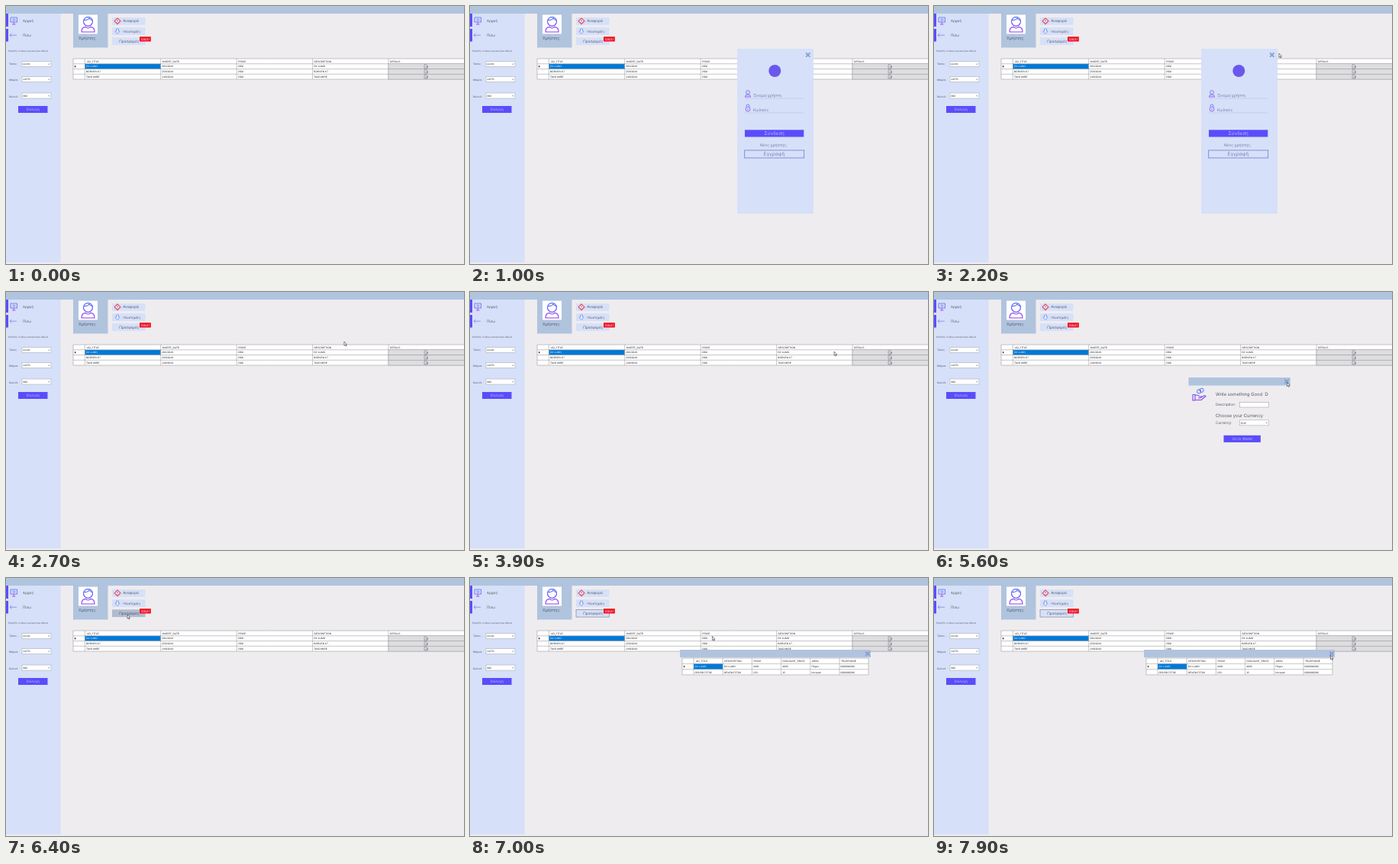
Write an HTML page with a canvas that moves like this. It is 600 px wide and 338 px high and loops after 8000 ms.

```html
<!DOCTYPE html>
<html lang="el">
<head>
<meta charset="utf-8">
<title>Car listings</title>
<style>
html, body { margin: 0; width: 100%; height: 100%; overflow: hidden; background: #eeecef; }
canvas { display: block; width: 600px; height: 338px; }
</style>
</head>
<body>
<canvas id="stage" width="600" height="338"></canvas>
<script>
const ctx = document.getElementById('stage').getContext('2d');
const LOOP = 8000, STEP = 100;
const PAGE = '#eeecef', STEEL = '#b0c4de', PALE = '#d6e0f8', VIOLET = '#5b4cfb';
const INK = '#30303c', SOFT = '#5f6296', BLUE = '#5a7ff0', GRID = '#a0a0a0';
const UI = 'Inter, "Noto Sans", sans-serif';
const CELL = '"Liberation Sans", Arial, sans-serif';

// Pointer tip: time, x, y
const PATH = [
  [1600, 541, 84], [1900, 500, 46], [2300, 443, 65], [2900, 443, 65],
  [3250, 477, 78], [3900, 477, 78], [4200, 548.5, 89], [4400, 548.5, 89],
  [4700, 466, 117], [5500, 462.5, 118.5], [5700, 462.5, 118.5],
  [6300, 159, 48], [6700, 159, 48], [7350, 517, 112], [7800, 519.5, 101.5]
];

function rect(x, y, w, h, fill, line, width = 0.6) {
  if (fill) { ctx.fillStyle = fill; ctx.fillRect(x, y, w, h); }
  if (line) { ctx.strokeStyle = line; ctx.lineWidth = width; ctx.strokeRect(x, y, w, h); }
}

function text(s, x, y, size, color = INK, font = UI, align = 'left', weight = 300) {
  ctx.font = `${weight} ${size}px ${font}`;
  ctx.fillStyle = color;
  ctx.textAlign = align;
  ctx.fillText(s, x, y);
}

function cell(s, x, y, color = '#222') {
  text(s, x, y, 3.3, color, CELL, 'left', 400);
}

function stroke(d, color, width = 0.8, x = 0, y = 0, fill) {
  ctx.save();
  ctx.translate(x, y);
  const p = new Path2D(d);
  if (fill) { ctx.fillStyle = fill; ctx.fill(p); }
  ctx.strokeStyle = color;
  ctx.lineWidth = width;
  ctx.stroke(p);
  ctx.restore();
}

function ring(x, y, r, color, width = 0.8, fill) {
  ctx.beginPath();
  ctx.arc(x, y, r, 0, Math.PI * 2);
  if (fill) { ctx.fillStyle = fill; ctx.fill(); }
  ctx.strokeStyle = color;
  ctx.lineWidth = width;
  ctx.stroke();
}

function fade(y0, y1) {
  const g = ctx.createLinearGradient(0, y0, 0, y1);
  g.addColorStop(0, '#4f78f2');
  g.addColorStop(1, '#9a35ee');
  return g;
}

function closeMark(x, y) {
  stroke('M-2.6-2.6L2.6 2.6M2.6-2.6L-2.6 2.6', '#6f8cc8', 1.5, x, y);
  stroke('M-2.6-2.6L2.6 2.6M2.6-2.6L-2.6 2.6', '#c3d2ee', 0.4, x, y);
}

function select(s, x, y) {
  rect(x, y, 38, 7, '#fff', '#a9adb8');
  cell(s, x + 1.5, y + 4.7);
  stroke('M-1.2-.6L0 .6L1.2-.6', '#555', 0.6, x + 35.3, y + 3.6);
}

function button(s, x, y, w, h, size) {
  rect(x, y, w, h, VIOLET);
  text(s, x + w / 2, y + h / 2 + size * 0.33, size, '#d3dcff', UI, 'center');
}

function grid(cols, top, header, rows, rowH) {
  const left = cols[0], right = cols[cols.length - 1];
  const bottom = top + rowH * (rows.length + 1);
  rect(left, top, right - left, bottom - top, '#fff');
  rect(cols[1], top + rowH, cols[2] - cols[1], rowH, '#0078d7');
  header.forEach((s, i) => cell(s, cols[i + 1] + 2 + (i ? 0 : 1), top + rowH * 0.68));
  rows.forEach((row, r) => row.forEach((s, i) =>
    cell(s, cols[i + 1] + 1.6, top + rowH * (r + 1.68), r || i ? '#222' : '#fff')));
  const lines = () => {
    ctx.beginPath();
    for (let y = top; y < bottom + 1; y += rowH) { ctx.moveTo(left, y); ctx.lineTo(right, y); }
    for (const x of cols) { ctx.moveTo(x, top); ctx.lineTo(x, bottom); }
    ctx.strokeStyle = GRID;
    ctx.lineWidth = 0.6;
    ctx.stroke();
  };
  lines();
  stroke('M0-1.3L1.6 0L0 1.3Z', '#222', 0.2, left + 2, top + rowH * 1.5, '#222');
}

function sidebar() {
  rect(0, 10, 71.5, 326, PALE);
  rect(0, 10, 3, 17, VIOLET);
  rect(0, 30, 3, 16.5, VIOLET);
  stroke('M6 15H14.5V21H6ZM10.2 21V24M8 24H12.5', fade(14, 24), 0.8);
  stroke('M9 17H12V19H9Z', BLUE, 0.6);
  stroke('M14 38.2H5M7.4 36L5 38.2L7.4 40.4', '#7b70ec', 0.7);
  text('Αρχική', 22, 20.6, 4.4);
  text('Πίσω', 22, 39.8, 4.5);
  text('Επιλέξτε τι είδους αυτοκινήτου θέλετε', 3, 59.7, 2.9);
  text('Τύπος:', 4, 77.4, 3.4);
  text('Μάρκα:', 4, 98, 3.4);
  text('Κυλινδ:', 4, 119.5, 3.4);
  select('κουπέ', 21, 72.5);
  select('AUTO', 21, 92.5);
  select('800', 21, 114);
  button('Επιλογή', 16, 131, 38.5, 9, 4.5);
}

function userPanel() {
  rect(88, 0, 45.5, 54.5, STEEL);
  rect(95, 11.5, 25, 25, '#fff');
  const g = fade(13, 35);
  ring(107.5, 20.3, 6, g, 1.2);
  stroke('M101.6 19Q106 19 108-2.5', 'transparent');
  stroke('M102 18.5Q107 19 109 16Q111 18.5 113.4 19M99 34Q99 28 104 27.4Q107.5 30.5 111 27.4Q116 28 116 34Z', g, 1.1);
  text('Χρήστης', 95, 44, 5.5, '#37415c');
}

function menu(t) {
  const hover = t >= 6200 && t < 6800;
  rect(139, 15, 43.5, 9.8, PALE);
  rect(139, 28.2, 43.5, 9.8, PALE);
  rect(139, 41.3, 43.5, 9.8, hover ? '#b1bbcf' : PALE, t >= 6600 ? '#6d7894' : null);
  stroke('M146 15.8L149.9 19.7L146 23.6L142.1 19.7Z', '#e64455', 1.1, 0, 0, '#f7e6f0');
  stroke('M146 18V20M146 20.8V21.5', '#4a63d8', 0.9);
  stroke('M144.6 30H147.4V33H149.2L146 36.6L142.8 33H144.6Z', '#6c92ee', 0.8, 0, 0, '#e6eefc');
  text('Αναφορά', 153.2, 21.4, 4.7);
  text('Υποστήριξη', 153.2, 34.6, 4.1);
  text('Προσφορές', 148.3, 47.8, 4.7);
  rect(175, 40.2, 14.8, 6.3, '#f01020');
  text('SALE!', 182.4, 44.8, 3.9, '#fff', UI, 'center', 400);
}

function listing() {
  const cols = [88, 103.3, 202.7, 302.2, 401.6, 501, 601];
  const cars = [['DX LUMO', '20/1/2019', '4500'], ['BORVEN K7', '25/6/2019', '2500'], ['TAVO MIRE', '13/6/2019', '3300']];
  grid(cols, 69, ['AD_TITLE', 'INSERT_DATE', 'PRICE', 'DESCRIPTION', 'DETAILS'],
    cars.map(c => [...c, c[0]]), 6.75);
  for (let i = 0; i < 3; i++) {
    const y = 75.75 + i * 6.75;
    rect(501, y, 100, 6.75, '#dedde0', GRID);
    stroke('M-2-2.3H1L2-1V2.3H-2ZM-.5 .5H2.8M1.6-.6L2.8 .5L1.6 1.6', '#666b78', 0.5, 550, y + 3.4);
  }
}

function login() {
  rect(350, 56, 100, 216, PALE);
  closeMark(442.8, 64);
  ctx.beginPath();
  ctx.arc(399.3, 85, 8, 0, Math.PI * 2);
  ctx.fillStyle = '#6a58ee';
  ctx.fill();
  const g = fade(110, 119);
  ring(364, 113, 2.4, g);
  stroke('M360.5 119Q360.5 116 364 116Q367.5 116 367.5 119Z', g);
  ring(364, 135, 3, fade(129, 139));
  stroke('M362 132V131Q362 129 364 129Q366 129 366 131V132M364 134V136', '#5b70ee');
  text('Όνομα χρήστη', 371, 118.8, 5.3, SOFT);
  text('Κωδικός', 371, 137.6, 5.1, SOFT);
  stroke('M360 121H438M360 140H438', '#b9c5e0', 0.6);
  button('Σύνδεση', 360, 162.3, 77.3, 9.2, 6.3);
  text('Νέος χρήστης;', 397.5, 183.8, 5.1, SOFT, UI, 'center');
  rect(359.7, 189, 78, 10, null, '#7378cf', 0.8);
  text('Εγγραφή', 398.5, 196.2, 6.4, SOFT, UI, 'center');
}

function payment() {
  rect(333.5, 112, 133.3, 85, PAGE);
  rect(333.5, 112, 133.3, 10.5, STEEL);
  closeMark(462, 117.2);
  const g = fade(126, 143);
  ring(347.2, 130.3, 2.6, '#4f70f0', 1);
  ring(350.6, 128.8, 2.6, '#4f70f0', 1);
  stroke('M339 134.5H342V142H339ZM342 136Q345 133.5 348 137H351M342 141.5H350L356 136.5Q355 134.5 351 137.5Q350 139 346 139', g, 1.1);
  text('Write something Good :D', 369, 135.6, 5.9);
  text('Description:', 369, 149.3, 4.7);
  rect(400.5, 144.5, 38, 6.5, '#fff', '#a0a4ae');
  text('Choose your Currency', 369, 163.5, 5.9);
  text('Currency:', 369, 173.2, 4.7);
  select('EUR', 400.5, 167.8);
  button('Go to Wallet', 379.5, 187.8, 48.4, 9.1, 4.7);
}

function offers() {
  rect(275, 94, 250, 34, PAGE);
  rect(275, 94, 250, 10, STEEL);
  closeMark(520.8, 99.2);
  grid([278, 293, 331.2, 369.4, 407.6, 445.8, 484, 522], 105,
    ['AD_TITLE', 'DESCRIPTION', 'PRICE', 'DISCOUNT_PRICE', 'AREA', 'TELEPHONE'],
    [['DX LUMO', 'DX LUMO', '4400', '4000', 'Πάρκο', '0000000000'],
     ['ORLEM F2700', 'ORLEM F2700', '150', '15', 'Κεντρικό', '0000000000']], 7.3);
}

function pointer(t) {
  if (t < PATH[0][0]) return;
  const i = PATH.findIndex(p => p[0] > t);
  let [, x, y] = PATH[PATH.length - 1];
  if (i > 0) {
    const [t0, x0, y0] = PATH[i - 1], [t1, x1, y1] = PATH[i];
    const k = (t - t0) / (t1 - t0), e = k * k * (3 - 2 * k);
    x = x0 + (x1 - x0) * e;
    y = y0 + (y1 - y0) * e;
  }
  stroke('M0 0V5.2L1.2 4.2L2 6L2.9 5.6L2.1 3.9H3.7Z', '#333', 0.6, x, y, '#fff');
}

function draw(now) {
  const t = Math.floor((now % LOOP) / STEP) * STEP;
  rect(0, 0, 600, 338, PAGE);
  rect(0, 0, 600, 10, STEEL);
  sidebar();
  userPanel();
  menu(t);
  listing();
  if (t >= 900 && t < 2500) login();
  if (t >= 4300 && t < 5700) payment();
  if (t >= 6800) offers();
  pointer(t);
}

ctx.textRendering = 'geometricPrecision';
const start = performance.now();
function tick() {
  draw(performance.now() - start);
  requestAnimationFrame(tick);
}
tick();
</script>
</body>
</html>
```
